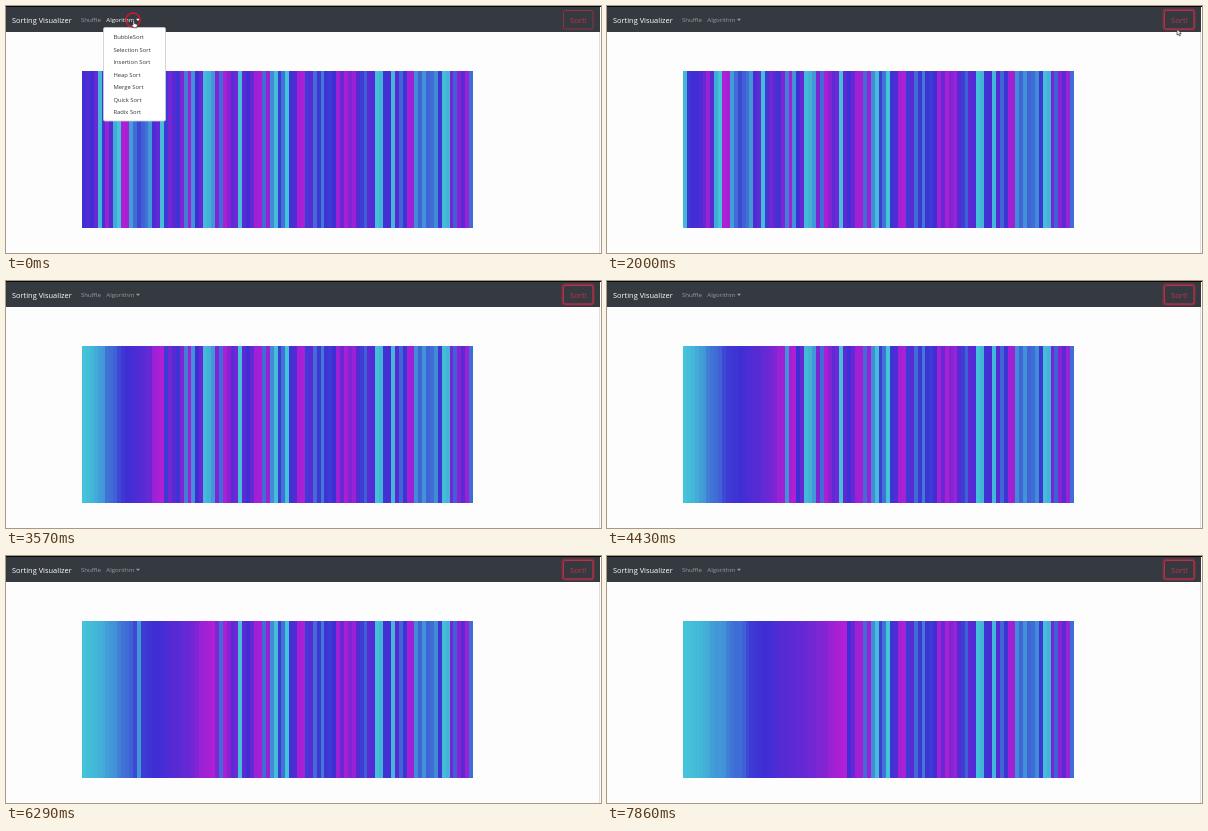
These frames come from a looping animation (595x247 px, 8 s). An HTML page:

```html
<!DOCTYPE html>
<html lang="en">
<head>
<meta charset="utf-8">
<title>Sorting Visualizer</title>
<style>
html, body { margin: 0; width: 100%; height: 100%; overflow: hidden; background: #fdfdfe; }
svg { display: block; width: 595px; height: 247px; font-family: "Open Sans", "Noto Sans", sans-serif; }
.nav { font-size: 6.1px; fill: #9a9da0; }
.item { font-size: 5.85px; fill: #30353a; }
</style>
</head>
<body>
<svg viewBox="0 0 595 247">
  <rect width="595" height="247" fill="#fdfdfe"/>
  <rect x="593" y="26" width="1" height="221" fill="#dedfe2"/>
  <rect width="594" height="26" fill="#343a40"/>
  <rect width="595" height="1" fill="#08090b"/>
  <text x="6" y="16.5" font-size="7.45" fill="#fff">Sorting Visualizer</text>
  <text class="nav" x="75" y="16.2">Shuffle</text>
  <g id="algorithm" class="nav">
    <text x="100.3" y="16.2">Algorithm</text>
    <path d="M130 12.8h4l-2 2.2z"/>
  </g>
  <g id="button" fill="none" stroke="#a9304a">
    <rect id="glow" x="556.5" y="3.5" width="31" height="20" rx="2.5" stroke="#7c3043" stroke-width="2"/>
    <rect x="557.5" y="4.5" width="29.5" height="18.5" rx="2" stroke-width=".8"/>
    <text x="564" y="16.7" font-size="7.7" fill="#c9304a" stroke="none">Sort!</text>
  </g>
  <g id="bars" shape-rendering="crispEdges"></g>
  <g id="menu">
    <rect x="97.5" y="21.5" width="62" height="93.5" rx="1.5" fill="#fff" stroke="#c9cbd0" stroke-width=".8"/>
  </g>
  <g id="ring" fill="none">
    <circle id="halo" stroke="#cdd2d8" stroke-width="1.3"/>
    <circle id="core" stroke="#d3152d" stroke-width="1.5"/>
    <circle id="dots" stroke="#33240f" stroke-width="1.5" stroke-dasharray="1.6 1.6"/>
  </g>
  <g id="cursor" fill="#fff" stroke="#333" stroke-width=".7" stroke-linejoin="round">
    <path id="arrow" d="M0 0v6l1.4-1.2 1 2.1 1-.5-1-2h1.8z"/>
    <path id="hand" d="M-1 0q.8-1 1.5 0v2.6l2.4.6q.6.3.4 1.2l-.6 2.4h-3l-2-2.6q.2-.9 1.3-.2z"/>
  </g>
</svg>
<script>
const LOOP = 8000, RATE = 7;
const el = id => document.getElementById(id);
const mix = (a, b, p) => a + (b - a) * p;

function add(parent, tag, attrs, text = "") {
  const node = document.createElementNS(parent.namespaceURI, tag);
  set(node, attrs);
  node.textContent = text;
  return parent.appendChild(node);
}
function set(node, attrs) {
  for (const key in attrs) node.setAttribute(key, attrs[key]);
}
function show(id, on) {
  el(id).style.display = on ? "" : "none";
}

// Interpolates rows of [time, ...values], holding the end rows.
function track(rows, t) {
  if (t <= rows[0][0]) return rows[0].slice(1);
  const i = rows.findIndex(row => row[0] > t);
  if (i < 0) return rows[rows.length - 1].slice(1);
  const a = rows[i - 1], b = rows[i], p = (t - a[0]) / (b[0] - a[0]);
  return a.slice(1).map((v, k) => mix(v, b[k + 1], p));
}

const values = [
  52, 58, 50, 68, 6, 47, 88, 60, 10, 2, 97, 94, 14, 30, 42, 34, 28, 16, 56, 64,
  4, 46, 72, 60, 48, 78, 24, 90, 18, 50, 66, 5, 8, 16, 76, 30, 96, 80, 63, 70,
  3, 62, 52, 66, 90, 93, 30, 88, 20, 4, 45, 28, 2, 48, 58, 92, 95, 46, 62, 30,
  47, 26, 48, 46, 50, 90, 68, 94, 78, 88, 60, 45, 34, 62, 58, 3, 7, 48, 55, 6,
  60, 32, 48, 92, 90, 20, 32, 18, 33, 30, 20, 47, 4, 7, 74, 34, 80, 62, 88, 30
];
const CYAN = [68, 202, 216], BLUE = [62, 46, 212], MAGENTA = [182, 30, 212];

function color(v) {
  const [a, b, p] = v < 50 ? [CYAN, BLUE, v / 50] : [BLUE, MAGENTA, (v - 50) / 50];
  return `rgb(${a.map((c, i) => Math.round(mix(c, b[i], p)))})`;
}

// Insertion sort, one snapshot per swap; done[n] is the snapshot with n bars in order.
const snapshots = [values.slice()], done = [0, 0];
for (let n = 1, list = values.slice(); n < 45; n++) {
  for (let j = n; j > 0 && list[j - 1] > list[j]; j--) {
    [list[j - 1], list[j]] = [list[j], list[j - 1]];
    snapshots.push(list.slice());
  }
  done.push(snapshots.length - 1);
}
const progress = [[1850, 1], [2710, 15], [3570, 21], [5430, 32], [7000, 38], [7860, 42]]
  .map(([t, n]) => [t, done[n]]);

const path = [
  [0, 128, 15], [140, 128, 17], [430, 130, 32], [710, 138, 54], [1000, 138, 54],
  [1140, 592, 36], [1430, 576, 15], [1860, 572, 15], [2290, 566, 40],
  [2710, 551, 94], [3150, 540, 130], [3430, 520, 200]
];
const clicks = [
  { from: 0, to: 140, x: 127, y: 14, r: 7, halo: 0 },
  { from: 1000, to: 1140, x: 138, y: 54, r: 6, halo: 10 },
  { from: 1140, to: 1290, x: 138, y: 54, r: 8.3, halo: 16.3 },
  { from: 1710, to: 1860, x: 572, y: 15, r: 7, halo: 0 },
  { from: 1860, to: 2000, x: 572, y: 15, r: 8.3, halo: 16.3 }
];

const WIDTH = 391 / values.length;
const bars = values.map((v, i) =>
  add(el("bars"), "rect", { x: 76 + i * WIDTH, y: 65, width: WIDTH + .05, height: 156.5 }));
["BubbleSort", "Selection Sort", "Insertion Sort", "Heap Sort", "Merge Sort", "Quick Sort", "Radix Sort"]
  .forEach((name, i) => add(el("menu"), "text", { class: "item", x: 107.4, y: 33.4 + i * 12.5 }, name));

function draw(t) {
  const list = snapshots[Math.round(track(progress, t)[0])];
  bars.forEach((bar, i) => set(bar, { fill: color(list[i]) }));

  show("menu", t < 990);
  el("algorithm").style.fill = t < 280 ? "#fff" : t < 1280 ? "#c3c6c9" : "";
  show("glow", t > 1700);
  set(el("button"), { stroke: t > 1700 ? "#d3304c" : "#a9304a" });

  const click = clicks.find(c => t >= c.from - 6 && t < c.to - 6);
  show("ring", click);
  if (click) {
    set(el("ring"), { transform: `translate(${click.x} ${click.y})` });
    set(el("halo"), { r: click.halo });
    set(el("core"), { r: click.r });
    set(el("dots"), { r: click.r });
    show("dots", click.halo > 12);
  }

  const [x, y] = track(path, t), linked = t < 990 || (t > 1420 && t < 1990);
  set(el("cursor"), { transform: `translate(${x} ${y})` });
  show("cursor", t < 3420);
  show("hand", linked);
  show("arrow", !linked);
}

const start = performance.now();
function tick() {
  const t = (performance.now() - start) % LOOP;
  draw(Math.floor((t + 6) * RATE / 1000) * 1000 / RATE);
  requestAnimationFrame(tick);
}
tick();
</script>
</body>
</html>
```
